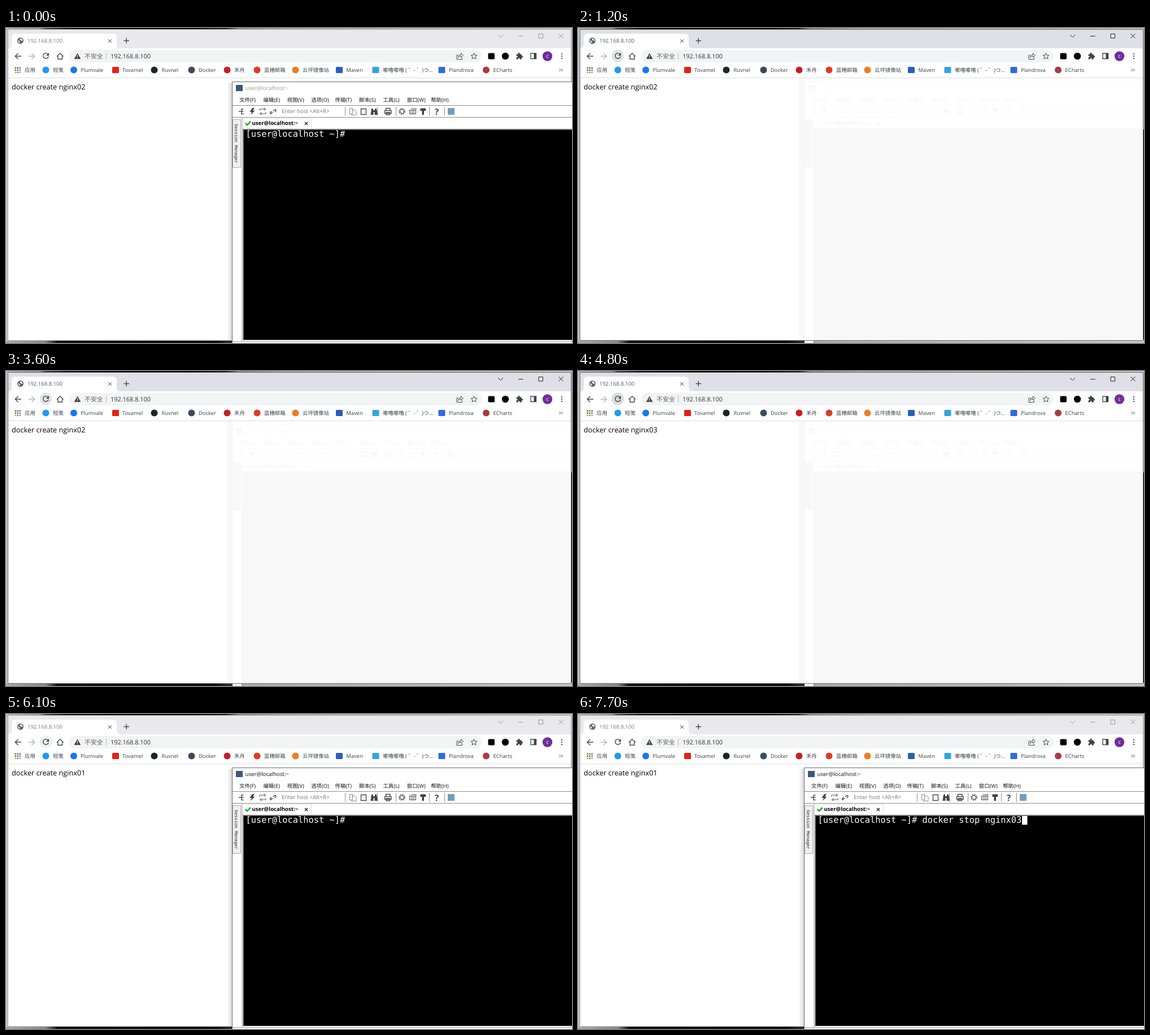
Write an HTML page that moves like this. It is 1002 by 559 pixels and loops after 8 s.

```html
<!DOCTYPE html>
<html lang="zh-CN">
<head>
<meta charset="utf-8">
<title>Load balancing demo</title>
<style>
html, body { margin: 0; width: 100%; height: 100%; overflow: hidden; background: #c4c4c4; }
svg { display: block; width: 1002px; height: 559px; }
text { font: 9.4px "Open Sans", "Noto Sans CJK SC", "Noto Sans CJK", sans-serif; fill: #3c4043; white-space: pre; text-rendering: geometricPrecision; }
.line { fill: none; stroke: #45494d; stroke-width: 1.4; }
.thin { stroke-width: 1; }
.pale { stroke: #b4b6b8; }
.solid { fill: #3f4246; }

#frame { stroke: #a9a9ad; }
#strip { fill: #e8e8ed; }
#controls { stroke: #97979b; }
#tabTitle { font-size: 9.5px; fill: #777a7e; }
#afterimage { visibility: hidden; }
.browser-front #frame { stroke: #66666a; }
.browser-front #strip { fill: #dfe0e7; }
.browser-front #controls { stroke: #222; }
.browser-front #tabTitle { fill: #54575b; }
.browser-front #shell { opacity: .033; }
.browser-front #screen { visibility: hidden; }
.browser-front #afterimage { visibility: visible; }

.address { font-size: 10.9px; fill: #303337; }
#page { font-size: 12.7px; fill: #000; }
#menus text { fill: #111; }
#shellTitle { font-size: 9.7px; }
.shell-tab { font-size: 9.6px; font-weight: 700; fill: #000; }
.manager { font: 7.8px "Liberation Mono", monospace; fill: #222; }
#prompt { font: 15.36px "DejaVu Sans Mono", monospace; fill: #fff; }
</style>
</head>
<body>
<svg id="stage" viewBox="0 0 1002 559">
  <defs>
    <linearGradient id="topEdge">
      <stop offset="0" stop-color="#b8b8b8"/><stop offset=".06" stop-color="#999"/>
      <stop offset=".07" stop-color="#444"/><stop offset=".11" stop-color="#111"/>
      <stop offset=".31" stop-color="#000"/><stop offset=".39" stop-color="#222"/>
      <stop offset=".41" stop-color="#888"/><stop offset=".5" stop-color="#aaa"/>
      <stop offset="1" stop-color="#c4c4c4"/>
    </linearGradient>
    <linearGradient id="bottomEdge">
      <stop offset="0" stop-color="#aaa"/><stop offset=".07" stop-color="#888"/>
      <stop offset=".09" stop-color="#111"/><stop offset=".37" stop-color="#0a0a0a"/>
      <stop offset=".4" stop-color="#333"/><stop offset=".42" stop-color="#aaa"/>
      <stop offset="1" stop-color="#c4c4c4"/>
    </linearGradient>
    <linearGradient id="shade">
      <stop offset="0" stop-color="#000" stop-opacity="0"/><stop offset="1" stop-color="#000" stop-opacity=".16"/>
    </linearGradient>
  </defs>

  <!-- Desktop edges -->
  <path fill="#c4c4c4" d="M0 0H1002V559H0Z"/>
  <path fill="url(#topEdge)" d="M0 0H1002V3H0Z"/>
  <path fill="url(#bottomEdge)" d="M0 555H1002V559H0Z"/>

  <!-- Browser -->
  <path id="frame" fill="#fff" d="M3.5 2.5H1000.5V554.5H3.5Z"/>
  <path id="strip" d="M4 3H1000V36H4Z"/>
  <path fill="#fff" d="M4 36Q10 36 10 29V17Q10 10 17 10H189Q196 10 196 17V29Q196 36 202 36Z"/>
  <g id="globe">
    <circle cx="25.500" cy="22.500" r="5.500" fill="#5f6368"/>
    <path fill="#fff" d="M21.500 21L24.500 24V26.500Q21.500 25.500 21.500 21ZM25 18.500L28.500 19.500L29.500 23L27.500 22.500L24.500 21Z"/>
  </g>
  <path id="spinner" class="line" d="M25.500 17.500A5 5 0 1 1 20.500 22.500"/>
  <text id="tabTitle" x="38" y="26">192.168.8.100</text>
  <path class="line thin" d="M181 20L187 26M187 20L181 26"/>
  <path class="line" d="M208.500 22.500H218M213.200 17.800V27.200"/>
  <path id="controls" fill="none" d="M871 12L875.500 16.500L880 12M907 14.500H915.500M943 10.500H950.500V18H943ZM978.500 10L986.500 18M986.500 10L978.500 18"/>

  <path class="line" d="M27 50H16.500M21.500 44.800L16.300 50L21.500 55.200"/>
  <path class="line pale" d="M40 50H50.500M45.500 44.800L50.700 50L45.500 55.200"/>
  <circle id="hover" cx="70.500" cy="49.500" r="11"/>
  <path class="line" d="M74.300 46.300A4.800 4.800 0 1 0 75.300 50.500"/>
  <path class="solid" d="M76 44V49H71Z"/>
  <path class="line" d="M90 50.500L95.800 44.800L101.600 50.500M92 49.500V55.300H99.600V49.500"/>
  <rect x="112" y="39" width="730" height="22" rx="11" fill="#f1f3f4"/>
  <path class="solid" d="M126.500 44.500L132.300 55H120.700Z"/>
  <path stroke="#fff" stroke-width="1.200" d="M126.500 48V51.500M126.500 52.500V53.800"/>
  <text class="address" x="139" y="53.500" style="fill:#5f6368">不安全</text>
  <path class="line thin pale" d="M177.500 44V56"/>
  <text class="address" x="185" y="53.500">192.168.8.100</text>
  <path class="line thin" d="M801 48H798V55.500H807.500V52.500M800.500 52.500Q801 47.500 805.500 47.500V44.800L809.500 48.600L805.500 52V49.700Q802.500 49.500 800.500 52.500Z"/>
  <path class="line thin" d="M828.500 44.500L830 48.200L834 48.500L831 51L832 55L828.500 52.800L825 55L826 51L823 48.500L827 48.200Z"/>
  <rect x="853.500" y="44.500" width="11.500" height="11" rx="2"/>
  <circle cx="884" cy="50" r="6.200"/>
  <path class="solid" d="M903.500 46.500H906.500Q905.800 43.800 908 43.800Q910.200 43.800 909.500 46.500H912.800V49.200Q915.200 48.800 915.200 50.800Q915.200 52.800 912.800 52.300V55.500H909.500Q909.500 53.200 908 53.200Q906.500 53.200 906.500 55.500H903.500V52.300Q905.800 52.300 905.800 50.800Q905.800 49.200 903.500 49.200Z"/>
  <path class="line" d="M929 45H938.500V54.500H929Z"/>
  <path class="solid" d="M934.500 45H939V55H934.500Z"/>
  <circle cx="958.500" cy="50" r="8.700" fill="#702e9b"/>
  <text x="958.500" y="53" text-anchor="middle" style="fill:#fff">c</text>
  <path class="solid" d="M983 45H985V47H983ZM983 49H985V51H983ZM983 53H985V55H983Z"/>

  <g id="bookmarks"></g>
  <path class="line thin" d="M979.500 72L982 74.500L979.500 77M983 72L985.500 74.500L983 77"/>
  <path stroke="#dcdde0" d="M4 88.500H1000"/>
  <text id="page" x="10" y="109">docker create nginx0<tspan id="digit">2</tspan></text>

  <!-- Faint traces left while the terminal is hidden -->
  <g id="afterimage">
    <path fill="#f8f8f9" d="M391 89H401V554H391ZM401 162H416V247H401ZM417 178H1000V554H417Z"/>
    <path fill="#f4f4f4" d="M401 555H417V559H401Z"/>
    <path d="M1001 180H1002V553H1001Z"/>
  </g>

  <!-- Terminal -->
  <g id="shell">
    <path fill="url(#shade)" d="M391 97H401V559H391Z"/>
    <path fill="#fff" stroke="#6a6a6a" d="M400.500 95.500H1004V562H400.500Z"/>
    <rect x="407" y="101" width="12" height="11" fill="#3d5873"/>
    <text id="shellTitle" x="423.500" y="110">user@localhost:~</text>
    <g id="menus"></g>
    <path stroke="#8c8c8c" d="M401 137.500H1002M401 158.500H1002"/>
    <path stroke="#8f8f8f" d="M600.500 140V156M657.500 140V156M690.500 140V156M749.500 140V156M776.500 140V156"/>
    <path class="line" d="M412 148H416M420.500 144H417V152.500H420.500M417 148H420.500"/>
    <path class="solid" d="M436 142L431.500 149H435L433 154.500L440.500 146.500H436.800L440 142Z"/>
    <path class="line pale" style="stroke:#888" d="M449 147V144H459M456.500 141.500L459.500 144L456.500 146.500M460 149V152H450M452.500 149.500L449.500 152L452.500 154.500"/>
    <path class="line" d="M473 147L475 145Q477.500 144 478 146Q478 148 475.500 149M472 149L470 151Q468 154 467.500 151Q467.500 149 470 148"/>
    <text x="488" y="151.300" style="font-size:9.800px;fill:#777">Enter host &lt;Alt+R&gt;</text>
    <path class="line thin" style="stroke:#888" d="M608.500 142.500H613.500V152.500H608.500ZM613.500 145.500H618L620 147.500V154.500H612V152.500"/>
    <path class="line" d="M628.500 143.500H637.500V153.500H628.500ZM631 143.500H635"/>
    <path class="solid" d="M647 143H650V146H653V143H656L658 154H652.500V149H650.500V154H645.500Z"/>
    <path class="line" d="M672.500 146V142.500H680V146M670.500 146.500H682V151.500H670.500ZM673 150H679.500V154H673Z"/>
    <circle class="line" cx="701" cy="148" r="3.600"/>
    <circle class="line" cx="701" cy="148" r="5.300" stroke-dasharray="2 2.160"/>
    <path class="line thin" d="M714.500 145.500H725.500V152.500H714.500ZM716 147.500H724M716 150.500H724M717 143H726V145"/>
    <path class="solid" d="M733.500 142.500H743V147H740V154H736.500V147H733.500Z"/>
    <text x="759" y="153.500" style="font-size:15px;font-weight:700">?</text>
    <rect x="782" y="142" width="12" height="12" fill="#719eb9"/>
    <path stroke="#999" d="M401 556.500H1002"/>
    <path fill="none" stroke="#ddd" d="M418.500 180V160.500H540.500V178"/>
    <path fill="none" stroke="#12b824" stroke-width="2.600" d="M423.500 169L427 172L433 166"/>
    <text class="shell-tab" x="435.500" y="172.300">user@localhost:~</text>
    <path class="line" style="stroke:#222" d="M529 167L534 172M534 167L529 172"/>

    <g id="screen">
      <path fill="#f0f0f0" stroke="#aaa" d="M401.500 162.500H415.500V247.500H401.500Z"/>
      <text class="manager" transform="translate(404.500 170) rotate(90)">Session Manager</text>
      <path stroke="#b5b5b5" d="M417.500 159V556"/>
      <path fill="#777" d="M419 179H1002V554H419Z"/>
      <path d="M421 181H1002V553H421Z"/>
      <text id="prompt" x="424.500" y="193.300"></text>
      <rect id="cursor" y="181" width="9.500" height="15.500" fill="#fff"/>
    </g>
  </g>
</svg>
<script>
const LOOP = 8000;
const $ = id => document.getElementById(id);

function add(parent, tag, attrs, label = "") {
  const node = document.createElementNS("http://www.w3.org/2000/svg", tag);
  for (const [key, value] of Object.entries(attrs)) node.setAttribute(key, value);
  node.textContent = label;
  parent.append(node);
}

// icon centre, text start, label, colour, square icon
const bookmarks = [
  [70.5, 83, "短笺", "#1d9bf0"],
  [120, 132, "Plumvale", "#1877f2"],
  [194, 206, "Tovamel", "#e62117", true],
  [262.5, 275.5, "Ruvnel", "#202327"],
  [328.5, 341, "Docker", "#3c4b5c"],
  [391.5, 404, "禾舟", "#c71d23"],
  [444.5, 457, "蓝穗邮箱", "#df3b24"],
  [512.5, 525, "云坪镜像站", "#f47a20"],
  [590, 602.5, "Maven", "#2860b8", true],
  [654.5, 667, "嘟噜嘟噜 ( ゜- ゜)つ…", "#31a6dc", true],
  [771.5, 784, "Plandrova", "#2d6be0", true],
  [850, 862.5, "ECharts", "#a63c45"]
];
const bar = $("bookmarks");
const appColors = ["#db4437", "#f4a000", "#0f9d58", "#4285f4"];
for (let i = 0; i < 9; i++) {
  add(bar, "rect", {
    x: 15.5 + i % 3 * 4, y: 69.5 + Math.floor(i / 3) * 4,
    width: 2.6, height: 2.6, fill: appColors[(i * 2 + (i > 4)) % 4]
  });
}
add(bar, "text", { x: 33, y: 78.3 }, "应用");
for (const [cx, x, label, fill, square] of bookmarks) {
  if (square) add(bar, "rect", { x: cx - 6, y: 69, width: 12, height: 11, rx: 1.5, fill });
  else add(bar, "circle", { cx, cy: 74.5, r: 6, fill });
  add(bar, "text", { x, y: 78.3 }, label);
}

["文件(F)", "编辑(E)", "视图(V)", "选项(O)", "传输(T)", "脚本(S)", "工具(L)", "窗口(W)", "帮助(H)"]
  .forEach((label, i) => add($("menus"), "text", { x: 413 + i * 42.4, y: 131.3 }, label));

// Each reload is answered by the next server in turn.
const reloads = [1600, 1800, 2000, 2300, 2600, 2900, 3100, 3400, 3600,
  3800, 4000, 4300, 4600, 4900, 5100, 5300, 5500];
const spins = [1900, 2400, 3000, 3900, 4700, 5200, 5600];
const hoverFill = [[0, "none"], [800, "#f8f9f9"], [900, "#eeefef"], [1200, "#e3e4e6"],
  [4600, "#dcdde0"], [6100, "#eeeff0"], [6300, "none"]];
const commands = [[0, ""], [7100, "docker start nginx03"], [7700, "docker stop nginx03"]];

const at = (track, t) => track.findLast(([start]) => start <= t)[1];
const show = (id, on) => { $(id).style.display = on ? "" : "none"; };
const setText = (id, value) => { if ($(id).textContent !== value) $(id).textContent = value; };

function draw(t) {
  const loading = spins.some(start => t >= start && t < start + 100);
  const command = at(commands, t);
  $("stage").classList.toggle("browser-front", t >= 1200 && t < 6100);
  $("hover").setAttribute("fill", at(hoverFill, t));
  $("shellTitle").style.fill = t < 6100 ? "#999" : "#111";
  show("globe", !loading);
  show("spinner", loading);
  setText("digit", String((1 + reloads.filter(start => start <= t).length) % 3 + 1));
  setText("prompt", "[user@localhost ~]# " + command);
  show("cursor", t >= 6600);
  $("cursor").setAttribute("x", 609.3 + command.length * 9.3);
}

const origin = performance.now();
function tick() {
  draw((performance.now() - origin) % LOOP);
  requestAnimationFrame(tick);
}
tick();
</script>
</body>
</html>
```
